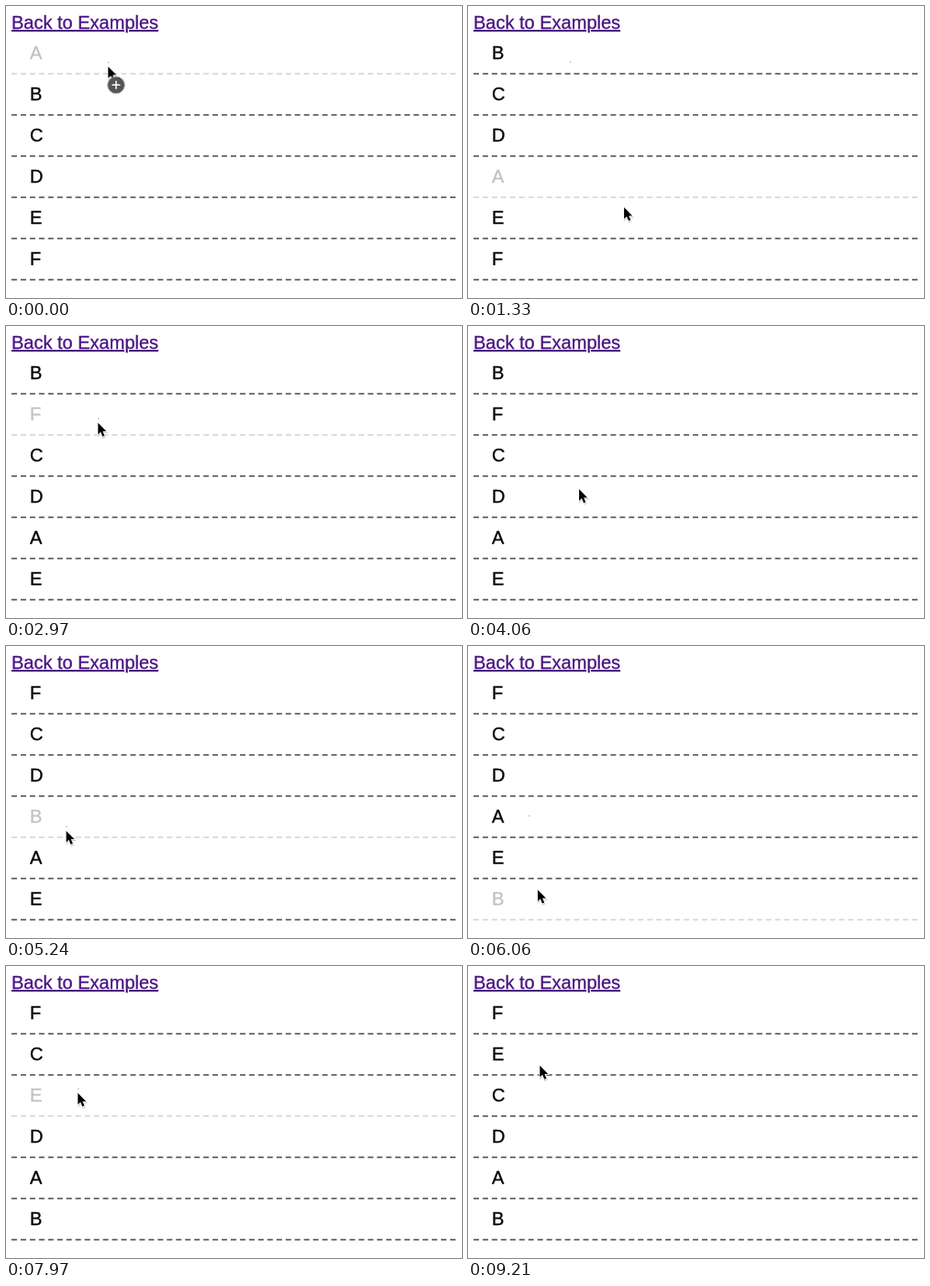
An HTML page for the animation above (9.24 s loop, 497x319 px).

```html
<!DOCTYPE html>
<html lang="en">
<head>
<meta charset="utf-8">
<title>Sortable list</title>
<style>
  html, body { margin: 0; width: 100%; height: 100%; overflow: hidden; background: #fff; }
  body { position: relative; font: 20px/23px "Liberation Sans", Arial, sans-serif; color: #000;
         -webkit-text-stroke: .3px; }
  #link { position: absolute; left: 6px; top: 7px; color: #4a1282; text-decoration: underline; white-space: nowrap; }
  .row { position: absolute; left: 6px; width: 484px; height: 45px; box-sizing: border-box;
         padding: 10px 0 0 20px; border-bottom: 2px dashed #757575; }
  svg { position: absolute; left: 0; top: 0; }
</style>
</head>
<body>
<span id="link">Back to Examples</span>
<svg width="497" height="319">
  <defs><path id="arrow" d="M0 0V14L3.2 11.1 5.5 16.5 8 15.4 5.7 10.2H10Z"/></defs>
  <rect id="ghost" width="1.5" height="1.5" fill="#bbb"/>
  <g id="pointer">
    <g transform="translate(.3 .8) scale(.9)">
      <use href="#arrow" x=".5" y="1.5" opacity=".2" stroke="#000" stroke-width="1.5"/>
      <use href="#arrow" stroke="#fff" stroke-width="1.8"/>
      <use href="#arrow"/>
    </g>
    <g id="badge" transform="translate(9 21)">
      <circle r="9.4" fill="#555" stroke="#bbb"/>
      <path d="M-4.5 0H4.5M0 -4.5V4.5" stroke="#fff" stroke-width="1.5"/>
    </g>
  </g>
</svg>
<script>
const LOOP = 9240, TOP = 29.5, PITCH = 45, NAMES = [..."ABCDEF"];
const REST = 330, HOLD = 270, RETURN = 390, FADE = 540;

// Each drag: grab at start, reach the new place at arrive, release, then stray aside until away
const drags = [
  { item: "A", start: 0, arrive: 760, away: 1330, grab: [111, 65], place: [113, 195], aside: [170, 219] },
  { item: "F", start: 2360, arrive: 2970, away: 4060, grab: [105, 276], place: [100, 105], aside: [121, 178] },
  { item: "B", start: 4850, arrive: 5730, away: 6390, grab: [75, 58], place: [61, 265], aside: [112, 267] },
  { item: "E", start: 7520, arrive: 8390, away: LOOP, grab: [78, 237], place: [78, 108], aside: [78, 108] }
];
const dropTime = drag => drag.arrive + HOLD;

const stops = drags.flatMap(drag => [
  { time: drag.start - REST, at: drag.grab },
  { time: drag.start, at: drag.grab },
  { time: drag.arrive, at: drag.place },
  { time: dropTime(drag), at: drag.place },
  { time: drag.away, at: drag.aside }
]);

const el = id => document.getElementById(id);
const rows = Object.fromEntries(NAMES.map(name => {
  const row = document.createElement("div");
  row.className = "row";
  row.textContent = name;
  document.body.insertBefore(row, document.querySelector("svg"));
  return [name, row];
}));

const easeOut = u => 1 - (1 - u) ** 2;
const mix = (a, b, k) => a.map((v, n) => v + (b[n] - v) * k);

function pointerAt(t) {
  const next = stops.findIndex(stop => stop.time > t);
  const a = stops[next - 1], b = stops[next];
  return mix(a.at, b.at, easeOut((t - a.time) / (b.time - a.time)));
}

const slotAt = y => Math.max(0, Math.min(5, Math.floor((y - TOP) / PITCH)));
const move = (node, [x, y]) => node.setAttribute("transform", `translate(${x} ${y})`);
const show = (node, visible) => { node.style.display = visible ? "" : "none"; };

function render(t) {
  const tip = pointerAt(t);
  const order = [...NAMES];
  let faded = "", badge = false, ghost = null;

  for (const drag of drags) {
    if (t < drag.start) break;
    const drop = dropTime(drag);
    const from = order.indexOf(drag.item);
    const to = slotAt(pointerAt(Math.min(t, drop))[1]);
    order.splice(from, 1);
    order.splice(to, 0, drag.item);

    if (t < drop + FADE) faded = drag.item;
    badge = t < drop && from === to;
    // The tiny drag image follows the pointer, then slides back to where it was grabbed
    if (t < drop) ghost = tip;
    else if (t < drop + RETURN) ghost = mix(drag.place, drag.grab, easeOut(Math.min(1, (t - drop) / 300)));
    else ghost = null;
  }

  order.forEach((name, slot) => {
    rows[name].style.top = 30 + slot * PITCH + "px";
    rows[name].style.opacity = name === faded ? 0.24 : 1;
  });
  move(el("pointer"), tip);
  show(el("badge"), badge);
  show(el("ghost"), ghost);
  if (ghost) move(el("ghost"), [ghost[0], ghost[1] - 4.5]);
}

const origin = performance.now();
function frame() {
  render((performance.now() - origin) % LOOP);
  requestAnimationFrame(frame);
}
frame();
</script>
</body>
</html>
```
